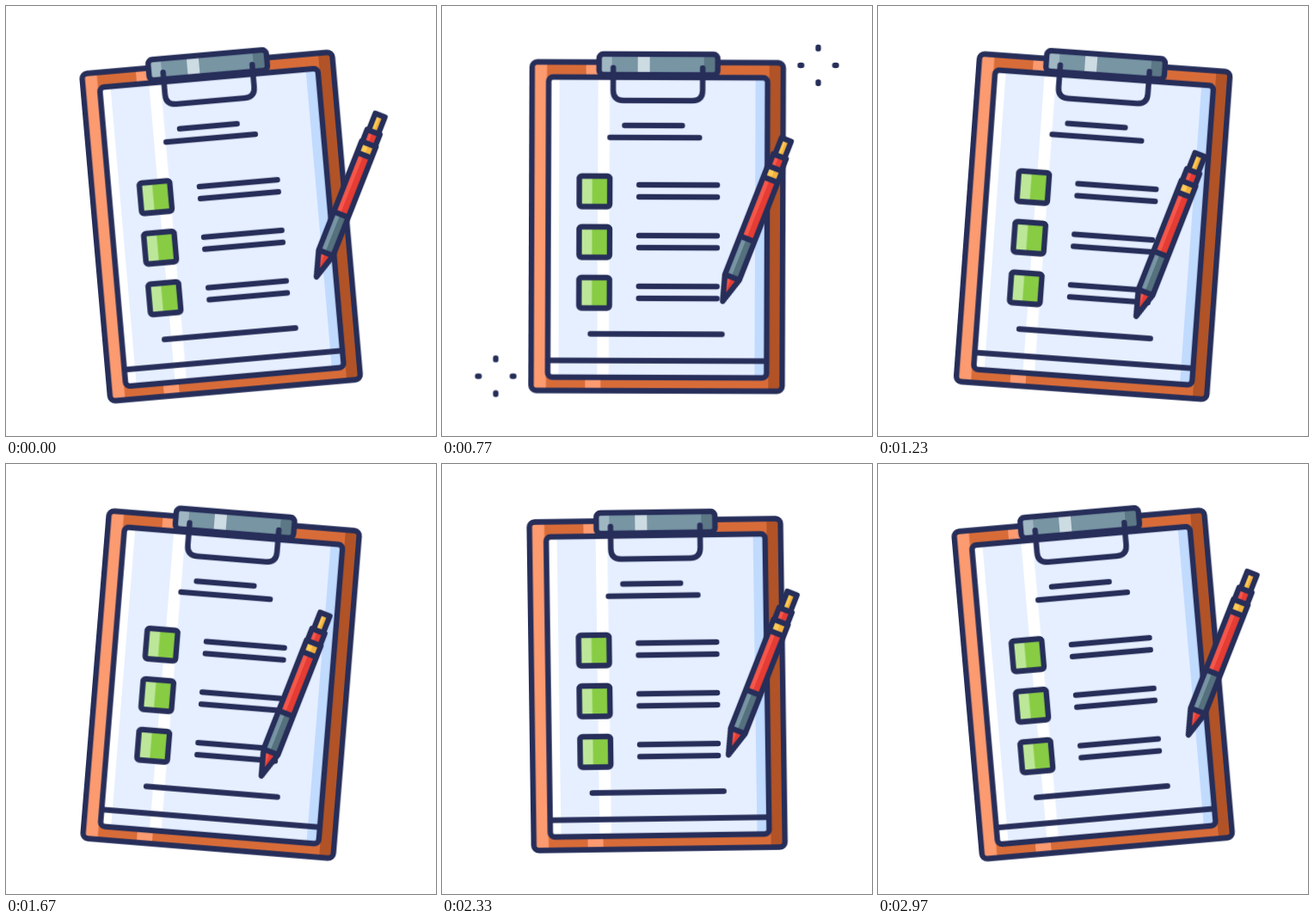
Animation, 500 px wide and 500 px high, one loop 3 s. Source, as an HTML page:

```html
<!DOCTYPE html>
<html lang="en">
<head>
<meta charset="utf-8">
<title>Checklist</title>
<style>
  html, body { margin: 0; width: 100%; height: 100%; overflow: hidden; background: #fff; }
  svg { display: block; width: 100vw; height: 100vh; }

  .ink { fill: none; stroke: #262e59; stroke-width: 6.4; stroke-linecap: round; stroke-linejoin: round; }

  .board, .pen-x, .pen-y { animation: 1.5s cubic-bezier(.333, 0, .667, 1) infinite alternate; }
  .board { transform-origin: 250px 256px; animation-name: tilt; }
  .pen-x { animation-name: slide-x; }
  /* A quicker vertical ease bends the path of the pen. */
  .pen-y { animation-name: slide-y; animation-timing-function: cubic-bezier(.3, 0, .6, 1); }

  @keyframes tilt { from { transform: rotate(-5deg); } to { transform: rotate(5deg); } }
  @keyframes slide-x { to { transform: translateX(-66.5px); } }
  @keyframes slide-y { to { transform: translateY(49px); } }

  .spark {
    stroke-dasharray: 10 60;
    animation: grow 3s infinite, shrink 3s infinite, show 3s step-end infinite;
    animation-timing-function: cubic-bezier(.333, 0, .667, 1), cubic-bezier(.333, 0, .667, 1), step-end;
  }
  @keyframes grow {
    0% { stroke-dasharray: 0 60; }
    16.667%, 100% { stroke-dasharray: 10 60; }
  }
  @keyframes shrink {
    0%, 13.333% { stroke-dashoffset: 0; }
    30%, 100% { stroke-dashoffset: -10; }
  }
  @keyframes show {
    0% { opacity: 0; }
    1% { opacity: 1; }
    30%, 100% { opacity: 0; }
  }
</style>
</head>
<body>
<svg viewBox="0 0 500 500">
  <defs>
    <path id="rays" d="M0-11v-10M11 0h10M0 11v10M-11 0h-10"/>
    <g id="item">
      <rect x="160" y="198" width="35" height="35" fill="#88cc44"/>
      <rect x="160" y="198" width="14.5" height="35" fill="#bce798"/>
      <rect class="ink" x="159.5" y="198" width="35.5" height="35.5" rx="3"/>
      <path class="ink" d="M229 208h91M229 222h91"/>
    </g>
  </defs>

  <g class="board">
    <!-- backing -->
    <rect x="104" y="65" width="292" height="382" rx="6" fill="#d86c39"/>
    <path d="M105 66h16.500v380h-16.500zM167 66h18v380h-18z" fill="#fc9a70"/>
    <path d="M380 66h15v380h-15z" fill="#b15327"/>
    <rect class="ink" x="104.200" y="65.500" width="292" height="382" rx="6"/>

    <!-- paper -->
    <rect x="123" y="83" width="255" height="349" rx="5" fill="#e6efff"/>
    <path d="M124 84h12v347h-12zM181 84h13.500v347h-13.500z" fill="#fff"/>
    <path d="M364 84h13v347h-13z" fill="#c1dbff"/>
    <rect class="ink" x="123.500" y="83" width="254.500" height="349" rx="5"/>
    <path class="ink" d="M124 412.500h254M212 139h67M195 153h104M173 381.500h153"/>

    <!-- clip -->
    <rect x="182" y="56" width="138" height="24" rx="4" fill="#7895a4"/>
    <path d="M183 57h14v22h-14z" fill="#9fb7c2"/>
    <path d="M227 57h14v22h-14z" fill="#cddbe2"/>
    <path d="M304 57h15v22h-15z" fill="#5c7886"/>
    <rect class="ink" x="182" y="56" width="138" height="24" rx="5"/>
    <path class="ink" d="M198.500 72v26q0 12 12 12h80q12 0 12-12v-26"/>

    <use href="#item"/>
    <use href="#item" y="59"/>
    <use href="#item" y="118"/>
  </g>

  <g class="pen-x"><g class="pen-y">
    <g transform="translate(361 315) rotate(21.5)">
      <path d="M0 0L-9-30V-166H9V-30zM-8-166V-181H8V-166z" fill="#e53c34"/>
      <path d="M0 0L-9-30H-1zM-9-78V-152H-1V-78zM-8-166V-181H-1V-166z" fill="#f5574a"/>
      <path d="M-9-30V-78H9V-30z" fill="#56717e"/>
      <path d="M-9-30V-78H-1V-30z" fill="#7895a4"/>
      <path d="M-9-152V-166H9V-152zM-6-181V-202H6V-181z" fill="#f3b23f"/>
      <path d="M-9-152V-166H0V-152zM-6-181V-202H0V-181z" fill="#ffcb57"/>
      <path class="ink" d="M0 0L-9-30V-166H9V-30zM-9-30H9M-9-78H9M-9-152H9M-8-166V-181H8V-166M-6-181V-202H6V-181"/>
    </g>
  </g></g>

  <g class="ink">
    <use class="spark" href="#rays" x="437.500" y="69"/>
    <use class="spark" href="#rays" x="62.500" y="430.500"/>
  </g>
</svg>
</body>
</html>
```
